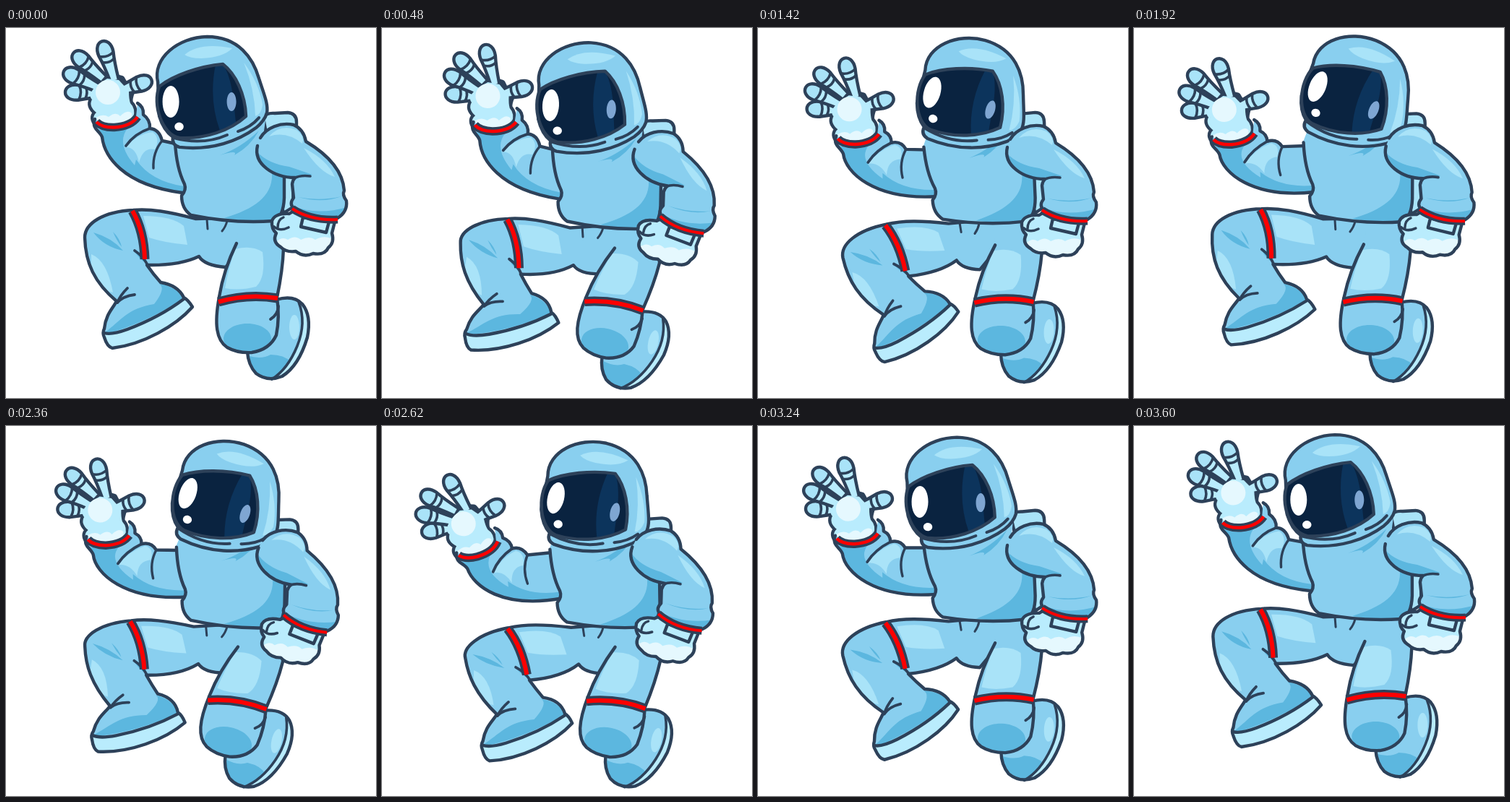
These frames come from a looping animation (512x512 px, 3620 ms). An HTML page with a canvas:

```html
<!DOCTYPE html>
<html>
<head>
<meta charset="utf-8">
<title>Waving astronaut</title>
<style>
html, body { margin: 0; width: 100%; height: 100%; overflow: hidden; background: #fff; }
canvas { display: block; width: 512px; height: 512px; }
</style>
</head>
<body>
<canvas id="stage" width="512" height="512"></canvas>
<script>
const ctx = document.getElementById('stage').getContext('2d');
const LOOP = 3620;
const INK = '#2d4159', BASE = '#89cfef', LIGHT = '#a9e3f8', SHADE = '#5cb7df';
const GLOVE = '#b9ecfd', SHINE = '#e5f8fe', RED = '#fe0000';

// ---- motion helpers ----
const smooth = (a, b, v) => {
  const k = Math.min(1, Math.max(0, (v - a) / (b - a)));
  return k * k * (3 - 2 * k);
};

// Periodic cubic through (xs, vs), period 1
function spline(xs, vs, p) {
  const n = xs.length;
  const at = k => {
    const m = ((k % n) + n) % n;
    return [xs[m] + Math.floor(k / n), vs[m]];
  };
  let i = n - 1;
  while (xs[i] > p) i--;
  const [a, b, c, d] = [at(i - 1), at(i), at(i + 1), at(i + 2)];
  const h = c[0] - b[0], u = (p - b[0]) / h;
  const m1 = h * (c[1] - a[1]) / (c[0] - a[0]);
  const m2 = h * (d[1] - b[1]) / (d[0] - b[0]);
  const u2 = u * u, u3 = u2 * u;
  return (2 * u3 - 3 * u2 + 1) * b[1] + (u3 - 2 * u2 + u) * m1
       + (3 * u2 - 2 * u3) * c[1] + (u3 - u2) * m2;
}

// Move pivot (x0,y0) to `to` and turn around it
function rigid(x0, y0, to, deg) {
  const c = Math.cos(deg * Math.PI / 180), s = Math.sin(deg * Math.PI / 180);
  return (x, y) => [
    to[0] + c * (x - x0) - s * (y - y0),
    to[1] + s * (x - x0) + c * (y - y0)
  ];
}

// Blend two bones by a weight depending on the rest position
const blend = (f, g, weight) => (x, y) => {
  const w = weight(x, y), a = f(x, y), b = g(x, y);
  return [a[0] + (b[0] - a[0]) * w, a[1] + (b[1] - a[1]) * w];
};

// ---- drawing helpers ----
const cache = new Map();
function parse(d) {
  if (!cache.has(d)) {
    cache.set(d, [...d.matchAll(/([MLQCZ])([^MLQCZ]*)/g)].map(m =>
      [m[1], (m[2].match(/-?[\d.]+/g) || []).map(Number)]));
  }
  return cache.get(d);
}
const METHOD = { M: 'moveTo', L: 'lineTo', Q: 'quadraticCurveTo', C: 'bezierCurveTo', Z: 'closePath' };

function trace(warp, d) {
  ctx.beginPath();
  for (const [cmd, n] of parse(d)) {
    const out = [];
    for (let i = 0; i < n.length; i += 2) out.push(...warp(n[i], n[i + 1]));
    ctx[METHOD[cmd]](...out);
  }
}
function fill(warp, d, color) {
  trace(warp, d);
  ctx.fillStyle = color;
  ctx.fill();
}
function line(warp, d, width = 4.4, color = INK, cap = 'round') {
  trace(warp, d);
  ctx.lineWidth = width;
  ctx.strokeStyle = color;
  ctx.lineCap = cap;
  ctx.lineJoin = 'round';
  ctx.stroke();
}
function part(warp, d, color, shades = [], edge = d) {
  fill(warp, d, color);
  ctx.save();
  ctx.clip();
  for (const [tone, s] of shades) fill(warp, s, tone);
  ctx.restore();
  line(warp, edge);
}
function band(warp, d, width = 13) {
  line(warp, d, width, INK, 'butt');
  line(warp, d, width - 7, RED, 'butt');
}
function oval(x, y, rx, ry) {
  const a = rx * .5523, b = ry * .5523;
  return `M${x + rx} ${y}C${x + rx} ${y + b} ${x + a} ${y + ry} ${x} ${y + ry}` +
    `C${x - a} ${y + ry} ${x - rx} ${y + b} ${x - rx} ${y}` +
    `C${x - rx} ${y - b} ${x - a} ${y - ry} ${x} ${y - ry}` +
    `C${x + a} ${y - ry} ${x + rx} ${y - b} ${x + rx} ${y}Z`;
}
// Tapered finger from its tip (x,y) to its root (rx,ry)
function finger(warp, x, y, rx, ry) {
  const len = Math.hypot(rx - x, ry - y), ux = (rx - x) / len, uy = (ry - y) / len;
  const local = (u, v) => warp(x + ux * u - uy * v, y + uy * u + ux * v);
  part(local, `M${len} -6Q22 -7.5 8 -10.5C-16 -13 -16 13 8 10.5Q22 7.5 ${len} 6`, GLOVE,
    [[LIGHT, 'M-14 -14L10 -14Q14 0 10 14L-14 14Z']]);
  line(local, 'M9 -10Q14 0 9 10', 3.6);
  line(local, 'M18 -8Q22 0 18 8', 3.6);
}

// ---- body parts ----
function backpack(w) {
  part(w, 'M356 124Q360 117 372 118L390 117Q402 118 402 130L402 150L398 210L397 248L384 256L370 200Z', LIGHT);
}

function shoe(w) {
  part(w, 'M374 376Q398 369 410 382Q423 398 417 428Q405 468 382 482Q362 490 346 478Q335 466 334 448L375 395Z', BASE, [
    [SHADE, 'M330 452Q352 460 366 452Q385 452 394 462L380 492L340 490Z'],
    [LIGHT, oval(399, 414, 7, 17)],
    [GLOVE, 'M405 378Q416 408 403 440Q390 474 366 488L395 490L430 430L420 380Z']
  ]);
  line(w, 'M405 379Q416 408 403 440Q390 472 368 486', 3.6);
}

function leftLeg(w) {
  part(w,
    'M262 264C225 254 200 250 176 252C135 254 109 270 109 290C110 325 122 352 153 378C148 388 138 396 136 416' +
    'Q133 422 136 428Q140 441 147 443C190 438 235 412 258 386Q252 376 246 373Q238 356 214 352Q204 341 195 328' +
    'Q240 329 267 316Q275 329 304 331L332 300L332 262Z', BASE, [
    [LIGHT, 'M190 260Q230 260 246 274L251 300Q218 297 198 290Z'],
    [LIGHT, 'M118 313Q140 322 148 366Q128 362 118 335Z'],
    [SHADE, 'M121 283Q146 290 162 308Q136 303 121 283Z'],
    [SHADE, 'M148 282Q158 292 160 303Q153 294 148 282Z'],
    [SHADE, 'M136 422C160 404 168 388 205 382Q222 360 212 354Q236 358 246 374Q195 408 136 424Z'],
    [GLOVE, 'M130 422Q146 425 168 417Q213 400 247 375L262 384L235 420L150 450Z'],
    [SHADE, 'M196 327Q184 320 178 309Q192 316 196 327Z']
  ]);
  line(w, 'M136 422Q146 425 168 417Q213 400 246 375');
  line(w, 'M154 380Q158 370 168 360', 3.8);
  line(w, 'M154 380Q162 371 178 369', 3.8);
  line(w, 'M178 308Q190 316 196 328', 3.8);
  line(w, 'M278 265L279 278', 3);
  line(w, 'M306 267Q304 275 299 281', 3);
  band(w, 'M175 253Q191 281 192 320');
}

function rightLeg(w) {
  const edge = 'M319 298Q301 335 295 372C288 410 291 432 306 442Q320 450 340 449Q365 445 374 425Q379 400 375 373Q383 335 384 305L384 264';
  part(w, edge + 'L324 262Z', BASE, [
    [LIGHT, 'M317 306Q340 300 355 310Q360 345 346 358Q322 364 303 360Q308 332 317 306Z'],
    [SHADE, oval(334, 430, 33, 21)]
  ], edge);
  line(w, 'M366 403Q376 397 377 385', 3.8);
  band(w, 'M294 379Q335 367 376 374');
}

function leftArm(w) {
  // glove
  line(w, 'M126 134Q117 124 125 117Q114 108 119 99Q112 90 126 76L144 66L160 70Q166 82 174 88Q170 100 172 104Q180 112 176 124Z', 8.5);
  finger(w, 92, 89, 126, 90);
  finger(w, 89, 64, 126, 82);
  finger(w, 101, 41, 134, 70);
  finger(w, 136, 28, 150, 72);
  finger(w, 192, 75, 160, 86);
  fill(w, 'M126 134Q117 124 125 117Q114 108 119 99Q112 92 126 79L140 70L156 72Q164 80 170 88Q170 98 172 104Q180 112 176 124L170 136Z', GLOVE);
  fill(w, oval(141, 89, 17, 17), SHINE);
  fill(w, 'M125 124Q134 118 142 123Q152 115 158 122Q168 112 174 118L174 130L130 134Z', SHINE);

  // sleeve
  const edge = 'M244 228C160 217 136 176 133 151C130 142 118 140 123 126';
  const top = 'Q191 109 190 120Q200 127 199 139Q212 140 216 156L262 166';
  fill(w, edge + 'Q150 146 180 122L182 104' + top + 'L262 200Z', BASE);
  ctx.save();
  ctx.clip();
  fill(w, 'M120 138Q150 146 168 139Q152 160 178 190L180 182Q200 212 246 219L246 232L150 225Z', SHADE);
  fill(w, 'M166 165Q182 146 203 144Q214 152 206 168Q190 164 184 186Q180 165 166 165Z', LIGHT);
  ctx.restore();
  line(w, edge);
  line(w, 'M182 104' + top);
  line(w, 'M166 163Q178 146 199 139', 3.8);
  line(w, 'M216 156Q203 172 204 194', 3.4);
  band(w, 'M125 130Q133 138 150 137.5Q173 136 182 123', 11.5);
}

function torso(w) {
  part(w, 'M233 158C235 178 239 200 247 216Q250 224 243 232Q243 250 256 259Q315 271 370 267Q384 262 385 235L385 205L352 180L360 120L240 140Z', BASE, [
    [SHADE, 'M368 200C370 232 345 250 302 263L380 275L392 205Z'],
    [SHADE, 'M296 176Q325 166 350 142Q338 164 316 176Q322 168 296 176Z']
  ], 'M234 158C235 178 239 200 247 216Q250 224 243 232Q243 250 256 259Q315 271 370 267Q384 262 385 235L385 205');
}

function head(w) {
  part(w, 'M210 75C202 42 238 13 278 12C322 12 342 42 350 70C357 92 363 105 361 117Q358 128 346 138C322 156 285 170 240 165Q229 162 231 151Q218 142 212 122Z', BASE, [
    [LIGHT, 'M247 37Q268 19 313 28Q300 41 270 42Q254 42 247 37Z'],
    [LIGHT, 'M329 48Q350 76 355 106Q353 120 345 122Q344 85 329 48Z']
  ]);
  line(w, 'M231 152Q272 163 306 148', 4);
  line(w, 'M321 143Q339 137 350 124', 4);
  part(w, 'M212 81C231 66 267 53 300 50C318 64 331 92 332 122C310 142 275 154 240 152C216 148 202 106 212 81Z', '#0a2340', [
    ['#0c345c', 'M290 50Q280 98 296 142Q310 137 318 130C315 104 314 72 300 50Z'],
    ['#7fa6d2', oval(312, 102, 6.5, 13)],
    ['#fff', oval(228, 102, 11.5, 22)],
    ['#fff', oval(239.5, 136.5, 6.2, 5.6)]
  ]);
}

function rightArm(w) {
  // fist
  part(w, 'M392 257Q372 256 368 267Q367 278 374 284Q368 296 380 303Q388 311 401 309Q412 318 425 312Q441 315 446 304Q455 297 451 284L455 268L400 252Z', GLOVE, [
    [SHINE, 'M374 296Q382 288 390 293Q400 286 408 293Q420 287 428 293Q440 286 452 292L446 318L380 316Z']
  ]);
  line(w, 'M371 275Q379 282 391 276', 3.6);
  line(w, 'M376 276Q376 265 384 262', 3.4);
  part(w, 'M411 262L447 268L443 283L408 275Z', GLOVE);

  // sleeve
  const edge = 'M352 152C360 138 380 130 398 134Q412 140 415 157C440 172 466 195 468 225Q465 231 471 239Q473 254 459 263Q425 265 399 250Q391 244 398 235L396 216Q397 210 400 207C370 207 342 188 348 163';
  part(w, edge + 'Z', BASE, [
    [SHADE, 'M346 170Q362 188 392 192Q410 198 424 203Q405 204 398 212L350 205Z'],
    [LIGHT, 'M364 150Q380 132 402 141Q414 150 410 160Q388 142 364 150Z'],
    [LIGHT, 'M412 166Q444 182 455 206Q434 200 412 166Z'],
    [SHADE, 'M404 234Q435 240 464 233Q438 243 404 234Z'],
    [SHADE, 'M396 246Q430 260 472 248L460 270L400 256Z']
  ], edge);
  line(w, 'M398 208Q408 203 421 205', 3.6);
  band(w, 'M396 250Q422 267 459 265', 11);
}

// ---- timing ----
const BOB = [0, .061, .265, .304, .591, .785];   // two cycles per loop
const WAVE = [0, .061, .138, .229, .365, .5, .65, .8, .92]; // eight cycles per loop

function draw(ms) {
  const loop = ms / LOOP, bob = loop * 2 % 1, wave = loop * 8 % 1;
  const b = (...v) => spline(BOB, v, bob);
  const s = (...v) => spline(WAVE, v, wave);

  const lean = b(0, .3, 1, 1, -2.5, -2.5);
  const body = rigid(315, 265, [315, 265 + b(0, 1, 9.5, 11, 10.5, 3)], lean);
  const nod = 11.2 * (1 - Math.cos(2 * Math.PI * (loop - .02)));
  const skull = rigid(295, 155, body(295, 155), lean + nod);

  const upper = rigid(240, 205, body(240, 205), lean + s(0, .7, -8, -13, -26, -32, -29, -16, -4));
  const fore = rigid(153, 130, upper(153, 130), lean + s(0, 2, 3, -.5, -14.5, -20, -19, -11, -3));
  const armL = blend(upper, fore, (x, y) => smooth(45, 100, (240 - x) * .76 + (205 - y) * .65));

  const armR = rigid(385, 150,
    [b(385, 386, 388, 388, 382, 382), b(150, 151, 160, 161, 157, 152)],
    b(0, 1, 8, 8.5, 6.2, 0));

  const thigh = rigid(185, 285,
    [b(185, 184.5, 183, 183, 192.5, 191), b(285, 283.5, 297, 302, 315.5, 303)],
    b(0, 1.3, 1, -2, -12, -8.5));
  const shin = rigid(202, 413.5,
    [b(202, 191.5, 182.5, 186.5, 222, 226.5), b(413.5, 413, 426.5, 430.5, 440.5, 426.5)],
    b(0, 4.2, 10.5, 9.4, -2, -6.6));
  const legL = blend(
    blend(thigh, shin, (x, y) => smooth(290, 370, y - .35 * (x - 185))),
    body, x => smooth(245, 310, x));

  const knee = rigid(334, 376,
    [b(334, 329.5, 320, 319, 328, 339.5), b(376, 378, 384, 385, 384.5, 379)],
    b(0, 2.5, 12.3, 12.3, 8.5, 2.7));
  const legR = blend(knee, body, (x, y) => smooth(298, 262, y));

  ctx.fillStyle = '#fff';
  ctx.fillRect(0, 0, 512, 512);
  backpack(body);
  shoe(knee);
  leftLeg(legL);
  rightLeg(legR);
  leftArm(armL);
  torso(body);
  head(skull);
  rightArm(armR);
}

const start = performance.now();
function tick() {
  const ms = (performance.now() - start) % LOOP;
  draw(Math.floor(ms / 20) * 20);
  requestAnimationFrame(tick);
}
tick();
</script>
</body>
</html>
```
